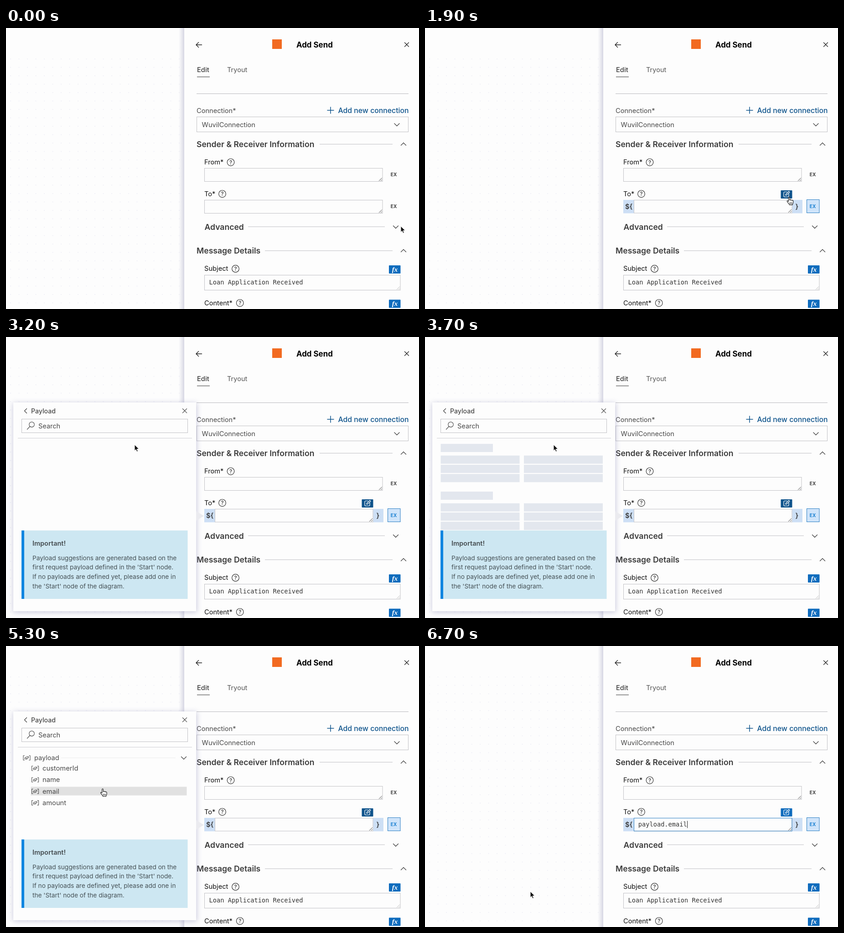
An HTML page for the animation above (6800 ms loop, 906 by 618 pixels).

```html
<!DOCTYPE html>
<html lang="en">
<head>
<meta charset="utf-8">
<title>Add Send</title>
<style>
  html, body { margin: 0; width: 100%; height: 100%; overflow: hidden; background: #fdfdfd; }
  svg { display: block; width: 906px; height: 618px; }
  text { font-family: Inter, "Open Sans", sans-serif; white-space: pre; }
  .mono { font-family: "DejaVu Sans Mono", "Liberation Mono", monospace; }
  .serif { font-family: "Liberation Serif", "Noto Serif", serif; }
</style>
</head>
<body>
<svg id="stage" viewBox="0 0 906 618" xmlns="http://www.w3.org/2000/svg"></svg>
<script>
const LOOP = 6800, STEP = 100;
const BLUE = '#0f6cbd', DEEP = '#0f548c', INK = '#3c3c3c', GREY = '#484848', LABEL = '#111', EDGE = '#c2c2c6';
const PAPER = '#fdfdfd', TINT = '#cddff5';

// Markup helpers
const text = (x, y, s, size = 14.6, fill = INK, weight = 400, extra = '') =>
  `<text x="${x}" y="${y}" font-size="${size}" fill="${fill}" font-weight="${weight}" ${extra}>${s}</text>`;
const mono = (x, y, s) => text(x, y, s, 13.7, '#333', 400, 'class="mono"');
const rect = (x, y, w, h, fill = 'none', stroke = 'none', r = 0) =>
  `<rect x="${x}" y="${y}" width="${w}" height="${h}" rx="${r}" fill="${fill}" stroke="${stroke}"/>`;
const box = (x, y, w, h, stroke = EDGE, r = 0) => rect(x + .5, y + .5, w - 1, h - 1, PAPER, stroke, r);
const path = (d, stroke = INK, width = 1.2, fill = 'none') =>
  `<path d="${d}" fill="${fill}" stroke="${stroke}" stroke-width="${width}" stroke-linecap="round" stroke-linejoin="round"/>`;
const rule = (x1, x2, y, color = '#bfbfc4', width = 1) =>
  `<path d="M${x1} ${y}H${x2}" stroke="${color}" stroke-width="${width}"/>`;
const group = (id, inner) => `<g id="${id}">${inner}</g>`;

// Small parts
const down = (x, y) => path(`M${x - 5.5} ${y - 2.5}l5.5 5.5 5.5-5.5`);
const up = (x, y) => path(`M${x - 5.5} ${y + 2.5}l5.5-5.5 5.5 5.5`);
const right = (x, y) => path(`M${x - 2.5} ${y - 5}l5 5-5 5`);
const cross = (x, y, r, color = '#222') =>
  path(`M${x - r} ${y - r}l${2 * r} ${2 * r}m0 ${-2 * r}l${-2 * r} ${2 * r}`, color, 1.2);
const grip = (x, y, color = '#444') => path(`M${x - 8} ${y - 2}l6-6M${x - 4} ${y - 2}l2-2`, color, 1);
const field = (x, y, w, h, stroke) => box(x, y, w, h, stroke) + grip(x + w, y + h);
const help = (x, y) => `<circle cx="${x}" cy="${y}" r="7.8" fill="none" stroke="#333" stroke-width="1.2"/>` +
  text(x, y + 4.2, '?', 11.5, '#333', 500, 'text-anchor="middle"');
const fx = y => rect(840, y, 25.5, 18, BLUE, 'none', 1) +
  text(853, y + 13.5, 'fx', 15, '#fff', 700, 'text-anchor="middle" font-style="italic" class="serif"');
const exLabel = (y, color) => text(850.6, y, 'EX', 10, color, 700, 'text-anchor="middle" letter-spacing=".2"');
const heading = (x, y, s) => text(x, y, s, 17.6, INK, 600);
const nodeIcon = (x, y) =>
  path(`M${x + 3} ${y - 5}h-2.5v10h2.5M${x + 13} ${y - 5}h2.5v10h-2.5`, '#555', 1.1) +
  path(`M${x + 4} ${y}l4-3 4 .5v2.5l-4 3-4-.5zM${x + 4} ${y}l4 .5 4-3M${x + 8} ${y + .5}v2.5`, '#555', 1);

const grid = () => `<defs>
  <pattern id="dots" x="8" y="66" width="18.5" height="18.5" patternUnits="userSpaceOnUse">
    <circle cx="2" cy="2" r=".9" fill="#e6e6f2"/></pattern>
  <filter id="soft" x="-10%" y="-10%" width="120%" height="120%"><feGaussianBlur stdDeviation="6"/></filter>
  <linearGradient id="side"><stop offset="0" stop-color="#d4d4e2" stop-opacity="0"/>
    <stop offset="1" stop-color="#cfcfdd" stop-opacity=".85"/></linearGradient></defs>` +
  rect(0, 0, 906, 618, PAPER) + rect(0, 64, 391, 554, 'url(#dots)');

const form = () =>
  rect(379, 0, 12, 618, 'url(#side)') + rect(391, 0, 515, 618, PAPER) +
  path('M429.5 37H417M422.5 31.5l-5.5 5.5 5.5 5.5', '#222', 1.4) +
  rect(584, 25, 21, 21, '#f26a21') +
  text(637, 43, 'Add Send', 16.9, '#000', 700) + cross(879, 36.5, 4.5) +
  text(419, 97, 'Edit', 14.7, INK, 500) + text(485, 97, 'Tryout', 14.6, '#555') +
  rule(419, 447, 107.5, '#666', 1.4) + rule(418, 883, 144.5, '#b8b8bc') +
  text(418, 187, 'Connection*', 14.6, GREY) +
  path('M705 181h14M712 174v14', DEEP, 1.5) +
  text(728.5, 187, 'Add new connection', 15.8, DEEP, 500) +
  box(418, 195, 465, 34) + text(429.5, 217.7, 'WuvilConnection', 14.6, GREY) + down(857.5, 212.5) +
  heading(418, 262, 'Sender &amp; Receiver Information') + rule(688, 848, 255.5) + up(872, 255.5) +
  text(435, 300.2, 'From*', 14.6, LABEL) + help(493, 295.3) + field(435, 308, 391.5, 30) + exLabel(326.2, INK) +
  text(435, 369.5, 'To*', 14.6, LABEL) + help(474.5, 364.8) +
  heading(435.5, 443.7, 'Advanced') + rule(531, 831, 437) + down(855, 437.5) +
  heading(418, 496.4, 'Message Details') + rule(568, 848, 489.8) + up(872, 490) +
  text(435, 534.3, 'Subject', 14.7, LABEL) + help(503.5, 529.5) + fx(522) +
  box(435, 543, 430.5, 34) + grip(865.5, 577, '#bbb') + mono(445.5, 564, 'Loan Application Received') +
  text(435, 609.5, 'Content*', 14.6, LABEL) + help(513.2, 604.8) + fx(597.5) +
  group('plain', field(435, 378, 391.5, 30) + exLabel(396.2, INK)) +
  group('expr',
    rect(435, 378, 23, 29.5, TINT) + rect(805.5, 378, 22.5, 29.5, TINT) +
    text(439, 398.3, '${', 14.8, INK, 600) + text(812.5, 398.3, '}', 14.8, INK, 600) +
    field(458, 378, 347.5, 29.5) +
    group('focus', rect(458.5, 378.5, 346.5, 28.5, 'none', '#2b7fc4')) +
    group('value', mono(467.7, 397.2, 'payload.email')) +
    group('caret', path('M0 385v15', '#222', 1)) +
    rect(837.5, 377.5, 27.5, 29, '#cfe4fa', '#2b7fc4') + exLabel(396.2, '#1a80d2') +
    `<rect id="edit" x="780.5" y="357" width="25" height="18" rx="1"/>` +
    path('M794 360.5h-5a2 2 0 0 0-2 2v7a2 2 0 0 0 2 2h7a2 2 0 0 0 2-2v-5M791 368l.6-2.5 6.5-6.3 1.9 1.9-6.5 6.3z', '#fff', 1.2));

const choice = (y, s) => box(34, y, 364.5, 57, '#bcbcbf', 6) + text(53.5, y + 34.3, s, 15.6, GREY) + right(373, y + 28.5);
const menu = () =>
  text(34.5, 172.3, 'Data', 14.6, INK, 500) + text(103, 172.3, 'Functions', 14.6, GREY) +
  text(208, 172.3, 'Configs', 14.6, GREY) + rule(34.5, 67, 180.7, '#555', 1.4) +
  choice(204, 'Payload') + choice(270.3, 'Variables') + choice(336.7, 'Headers') +
  rule(34, 398.5, 410.3, '#d3d3da') + choice(427, 'Params') + choice(493.3, 'Properties');

const bars = () => [235, 340].map(y =>
  rect(34.5, y, 114.5, 18, '#e3e7ee') +
  [0, 1, 2].map(i => [34.5, 217].map(x => rect(x, y + 25.7 + i * 20.3, 173, 18, '#e3e7ee')).join('')).join('')).join('');

const ROW_TOP = 259, ROW_H = 25.3;
const tree = () =>
  `<rect id="hover" x="54.5" width="342" height="19" fill="#e1e1e1"/>` +
  nodeIcon(37.5, 246) + text(62, 251, 'payload', 14.5, GREY) + rule(121, 372, 246, '#ececec') + down(390, 246) +
  ['customerId', 'name', 'email', 'amount'].map((s, i) => {
    const y = ROW_TOP + 10 + i * ROW_H;
    return nodeIcon(56, y) + text(80, y + 5, s, 14.7, GREY);
  }).join('');

const NOTE = ['Payload suggestions are generated based on the', "first request payload defined in the 'Start' node.",
  'If no payloads are defined yet, please add one in', "the 'Start' node of the diagram."];
const browser = () =>
  path('M45.5 157.5l-5 5 5 5') + text(55, 167.6, 'Payload', 14.1, GREY, 500) + cross(392, 162.3, 4.6, '#444') +
  box(34, 180, 365, 31) + `<circle cx="56.5" cy="192.5" r="5.7" fill="none" stroke="#555" stroke-width="1.2"/>` +
  path('M52.5 196.7l-6 6.5') + text(71, 200.8, 'Search', 14.5, GREY) + rule(26, 408, 222.5, '#cfcfd4') +
  group('bars', bars()) + group('tree', tree()) +
  rect(34, 425.5, 364.5, 150.5, '#cde7f2') + rect(34, 425.5, 6, 150.5, '#0f86e0') +
  text(58, 458.5, 'Important!', 14.5, '#454c50', 600) +
  NOTE.map((s, i) => text(58, 490.6 + i * 20.8, s, 13.68, '#455055')).join('');

const popup = () => group('popup',
  `<rect x="15" y="145" width="404" height="461" fill="#8f8fb8" opacity=".42" filter="url(#soft)"/>` +
  `<path d="M417 383l17 10.5-17 10.5z" fill="#ebebef"/>` + rect(16, 144, 401, 459, PAPER) +
  group('menu', menu()) + group('browser', browser()));

const pointer = () =>
  group('arrow', path('M0 0v13.2l3-2.8 2.1 4.9 2.3-1-2.1-4.8h4.2z', '#fff', 1, '#111')) +
  group('hand', path('M-1.3 9.5V1.5c0-2 2.6-2 2.6 0v5c.2-1.5 2.5-1.4 2.7.2.3-1 2.4-.8 2.6.5.3-.9 2.4-.6 2.4.9v3.4c0 2-1.5 2.7-1.5 5.2H.6c0-2.2-3.2-4.2-4.8-7.2-.9-1.7.9-2.7 2.9 0z', '#111', 1.1, '#fff') +
    path('M1.5 11.5v3M3.8 11.5v3M6 11.5v3', '#111', .9));

document.getElementById('stage').innerHTML = grid() + form() + popup() + group('cursor', pointer());

const el = id => document.getElementById(id);
const show = (id, on) => el(id).setAttribute('display', on ? 'inline' : 'none');
const within = (t, a, b) => t >= a && t < b;

// Pointer moves: start, end, target
const HOME = [866, 436];
const MOVES = [
  [200, 600, 846, 393],
  [1400, 2100, 787, 367],
  [2600, 3000, 282, 237],
  [4500, 5100, 212, 314],
  [5900, 6700, 231, 540]
];
const ease = p => p * p * (3 - 2 * p);
function pointerAt(t) {
  let [x, y] = HOME;
  for (const [a, b, tx, ty] of MOVES) {
    const p = ease(Math.min(1, Math.max(0, (t - a) / (b - a))));
    x += (tx - x) * p;
    y += (ty - y) * p;
  }
  return [x, y];
}

const TOGGLE = 700, OPEN = 2300, PICK = 3100, LOAD = 3300, LISTED = 4200, INSERT = 5500;

function draw(t) {
  const [x, y] = pointerAt(t);
  const open = within(t, OPEN, INSERT), listed = within(t, LISTED, INSERT), done = t >= INSERT;
  const focused = within(t, OPEN, PICK) || done;
  show('plain', t < TOGGLE);
  show('expr', t >= TOGGLE);
  show('focus', focused);
  show('value', done);
  const blink = t - (done ? INSERT : OPEN);
  show('caret', focused && blink % 1000 < 500);
  el('caret').setAttribute('transform', `translate(${done ? 575.5 : 468.5} 0)`);

  show('popup', open);
  show('menu', t < PICK);
  show('browser', t >= PICK);
  show('bars', within(t, LOAD, LISTED));
  el('bars').setAttribute('opacity', Math.min(1, Math.max(0, (t - LOAD + 100) / 400)));
  show('tree', listed);
  const row = Math.floor((y + 5 - ROW_TOP) / ROW_H);
  const onRow = listed && row >= 0 && row < 4;
  show('hover', onRow);
  el('hover').setAttribute('y', ROW_TOP + Math.max(0, row) * ROW_H);

  const onEx = x > 837 && x < 866 && y > 377 && y < 407;
  const onEdit = t >= TOGGLE && x > 780 && x < 806 && y > 356 && y < 376;
  const onMenu = within(t, OPEN, PICK) && x > 34 && x < 399 && y > 204;
  el('edit').setAttribute('fill', open || onEdit && !done ? DEEP : BLUE);
  const hand = onEx || onEdit || onMenu || onRow;
  show('hand', hand);
  show('arrow', !hand);
  el('cursor').setAttribute('transform', `translate(${x} ${y})`);
}

const begin = performance.now();
function tick() {
  const t = (performance.now() - begin) % LOOP;
  draw(Math.floor(t / STEP) * STEP);
  requestAnimationFrame(tick);
}
tick();
</script>
</body>
</html>
```
